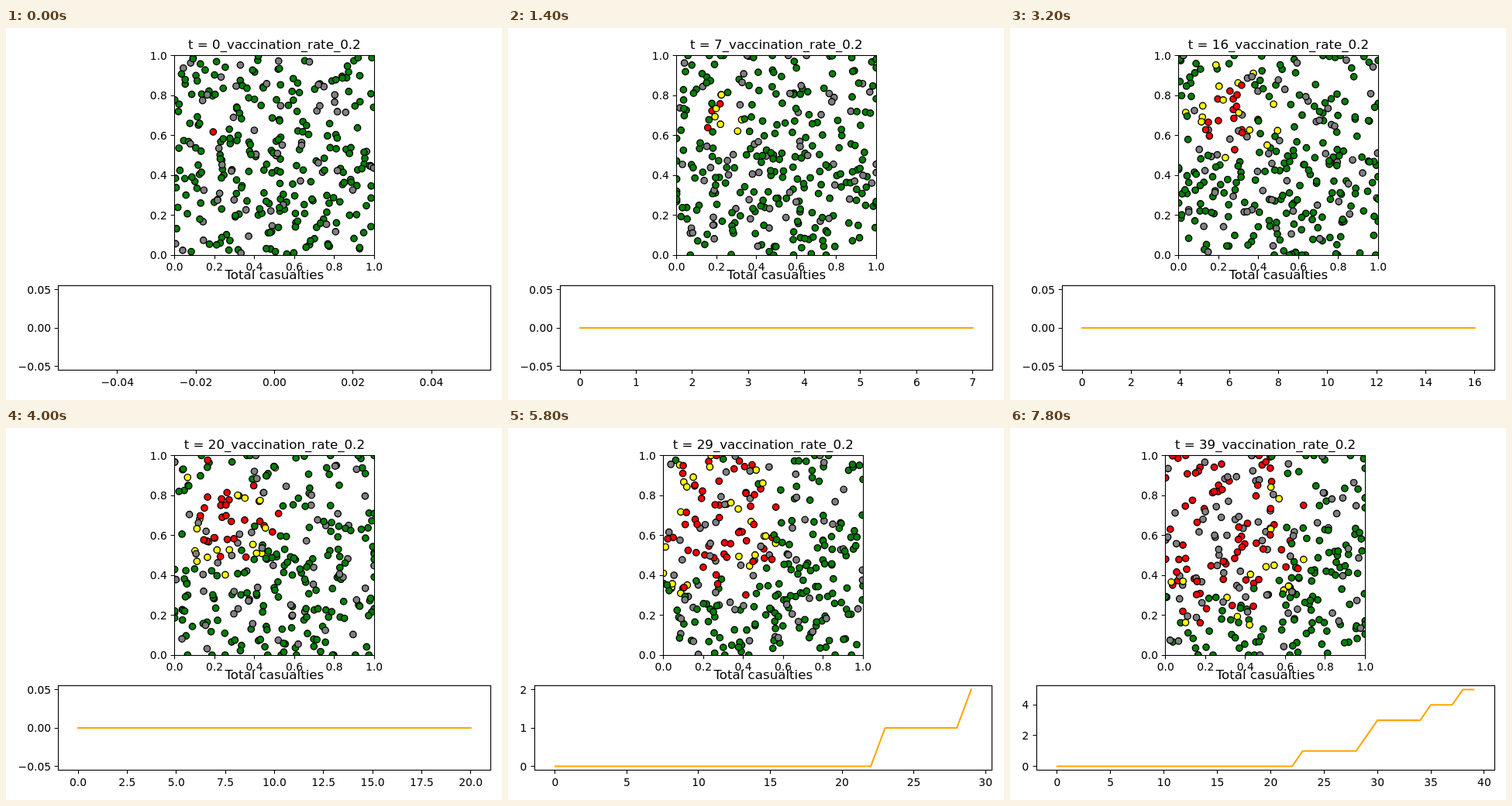
An HTML page for the animation above (8 s loop, 640 by 480 pixels).

```html
<!DOCTYPE html>
<html lang="en">
<head>
<meta charset="utf-8">
<title>Vaccination simulation</title>
<style>
  html, body { margin: 0; width: 100%; height: 100%; overflow: hidden; background: #fff; }
  svg { display: block; width: 640px; height: 480px; font-family: "DejaVu Sans", sans-serif; font-size: 13.89px; }
  .title { font-size: 16.67px; }
  .frame, .ticks { fill: none; stroke: #000; stroke-width: 1.11; }
  .people { stroke: #000; stroke-width: 1.39; }
  .curve { fill: none; stroke: orange; stroke-width: 2.08; stroke-linejoin: round; stroke-linecap: square; }
</style>
</head>
<body>
<svg id="figure" viewBox="0 0 640 480"></svg>
<script>
const STEP_MS = 200, STEPS = 40;
const POPULATION = 300, VACCINATED = 60;
const STRIDE = 0.05, INCUBATION = 5, RECOVERY = 25;
const HUB = { x: 0.24, y: 0.7 };
const DEATH_STEPS = [23, 29, 30, 35, 38];
// [step, people infected so far]
const SPREAD = [[0, 1], [2, 4], [7, 10], [12, 18], [15, 28], [20, 46], [24, 58], [29, 82], [39, 114]];

const EM = 13.89;
const PLOT = { top: 35.5, bottom: 293 };
const CHART = { top: 332.5, bottom: 441.5, right: 625 };

function seededRandom(seed) {
  return () => {
    seed = (seed + 0x6D2B79F5) | 0;
    let h = Math.imul(seed ^ (seed >>> 15), seed | 1);
    h ^= h + Math.imul(h ^ (h >>> 7), h | 61);
    return ((h ^ (h >>> 14)) >>> 0) / 4294967296;
  };
}
const random = seededRandom(20);
const clamp01 = v => Math.min(1, Math.max(0, v));
const snap = v => Math.floor(v) + 0.5;

function infectedBy(step) {
  const i = SPREAD.findIndex(([s]) => s >= step);
  if (i === 0) return SPREAD[0][1];
  const [s0, n0] = SPREAD[i - 1], [s1, n1] = SPREAD[i];
  return Math.round(n0 + (n1 - n0) * (step - s0) / (s1 - s0));
}

function colorOf(person, step) {
  if (person.immune) return "gray";
  if (person.caught === null) return "green";
  const age = step - person.caught;
  return age < INCUBATION ? "yellow" : age < RECOVERY ? "red" : "gray";
}

function simulate() {
  const people = Array.from({ length: POPULATION }, (_, i) => ({
    x: random(), y: random(), luck: random(),
    immune: i % (POPULATION / VACCINATED) === 1, caught: null, dead: false
  }));
  Object.assign(people[0], { x: 0.193, y: 0.617, caught: -INCUBATION });
  const resistance = p => Math.hypot(1.2 * (p.x - HUB.x), p.y - HUB.y) * (1 + 0.7 * p.luck);
  let infected = 1;

  return Array.from({ length: STEPS }, (_, step) => {
    if (step > 0) {
      for (const p of people) {
        p.x = clamp01(p.x + (random() * 2 - 1) * STRIDE);
        p.y = clamp01(p.y + (random() * 2 - 1) * STRIDE);
      }
    }
    const target = infectedBy(step);
    people.filter(p => !p.immune && p.caught === null)
      .sort((a, b) => resistance(a) - resistance(b))
      .slice(0, target - infected)
      .forEach(p => { p.caught = step; });
    infected = target;

    if (DEATH_STEPS.includes(step)) {
      people.filter(p => !p.dead && colorOf(p, step) === "red")
        .sort((a, b) => a.caught - b.caught)[0].dead = true;
    }
    return people.filter(p => !p.dead).map(p => ({ x: p.x, y: p.y, color: colorOf(p, step) }));
  });
}

const casualties = step => DEATH_STEPS.filter(s => s <= step).length;
const limits = max => max ? [-0.05 * max, 1.05 * max] : [-0.055, 0.055];

// Evenly spaced round values, at most `bins` intervals
function makeTicks([lo, hi], bins) {
  const raw = (hi - lo) / bins;
  const magnitude = 10 ** Math.floor(Math.log10(raw));
  const gap = +([1, 2, 2.5, 5, 10].find(s => s * magnitude >= raw) * magnitude).toPrecision(3);
  const decimals = (String(gap).split(".")[1] || "").length;
  const ticks = [];
  for (let i = Math.ceil(lo / gap); i * gap <= hi; i++) {
    ticks.push({ value: i * gap, label: (i * gap).toFixed(decimals).replace("-", "\u2212") });
  }
  return ticks;
}

const charWidth = { ".": 0.318, "\u2212": 0.838 };
const labelWidth = label => [...label].reduce((w, c) => w + (charWidth[c] || 0.636), 0) * EM;
const scale = ([lo, hi], a, b) => v => a + (v - lo) / (hi - lo) * (b - a);
const text = (x, y, content, anchor, cls = "") =>
  `<text x="${x.toFixed(2)}" y="${y.toFixed(2)}" text-anchor="${anchor}" class="${cls}">${content}</text>`;

function drawAxes({ left, right, top, bottom }, xTicks, yTicks, toX, toY, title) {
  const [l, r, t, b] = [left, right, top, bottom].map(snap);
  let marks = "", labels = "";
  for (const { value, label } of xTicks) {
    marks += `M${snap(toX(value))} ${b}v4.86`;
    labels += text(toX(value), bottom + 20.2, label, "middle");
  }
  for (const { value, label } of yTicks) {
    marks += `M${l} ${snap(toY(value))}h-4.86`;
    labels += text(left - 9.7, toY(value) + 5.1, label, "end");
  }
  return `<path class="ticks" d="${marks}"/>
    <rect class="frame" x="${l}" y="${t}" width="${r - l}" height="${b - t}"/>
    ${labels}${text((left + right) / 2, top - 8.3, title, "middle", "title")}`;
}

function drawFigure(people, step) {
  const xRange = limits(step), yRange = limits(casualties(step));
  const xTicks = makeTicks(xRange, 9), yTicks = makeTicks(yRange, 3);
  const left = 25.2 + Math.max(...yTicks.map(t => labelWidth(t.label)));

  // The last label may push the right edge inwards
  const last = xTicks[xTicks.length - 1];
  const labelEnd = scale(xRange, left, CHART.right)(last.value) + labelWidth(last.label) / 2;
  const right = CHART.right - Math.max(0, labelEnd - CHART.right);
  const chart = { ...CHART, left, right };
  const chartX = scale(xRange, left, right);
  const chartY = scale(yRange, chart.bottom, chart.top);

  const half = (PLOT.bottom - PLOT.top) / 2, center = (left + right) / 2;
  const plot = { ...PLOT, left: center - half, right: center + half };
  const plotX = scale([0, 1], plot.left, plot.right);
  const plotY = scale([0, 1], plot.bottom, plot.top);
  const unitTicks = makeTicks([0, 1], 5);

  const dots = people.map(p =>
    `<circle cx="${plotX(p.x).toFixed(2)}" cy="${plotY(p.y).toFixed(2)}" r="4.17" fill="${p.color}"/>`).join("");
  const points = Array.from({ length: step + 1 }, (_, s) =>
    `${chartX(s).toFixed(2)},${chartY(casualties(s)).toFixed(2)}`).join(" ");

  return `<clipPath id="plotArea"><rect x="${plot.left}" y="${plot.top}" width="${2 * half}" height="${2 * half}"/></clipPath>
    <g class="people" clip-path="url(#plotArea)">${dots}</g>
    ${drawAxes(plot, unitTicks, unitTicks, plotX, plotY, `t = ${step}_vaccination_rate_0.2`)}
    ${step ? `<polyline class="curve" points="${points}"/>` : ""}
    ${drawAxes(chart, xTicks, yTicks, chartX, chartY, "Total casualties")}`;
}

const figure = document.getElementById("figure");
const history = simulate();
const start = performance.now();
let shown = -1;

function render() {
  const step = Math.floor((performance.now() - start) / STEP_MS) % STEPS;
  if (step !== shown) {
    figure.innerHTML = drawFigure(history[step], step);
    shown = step;
  }
  requestAnimationFrame(render);
}
render();
</script>
</body>
</html>
```
